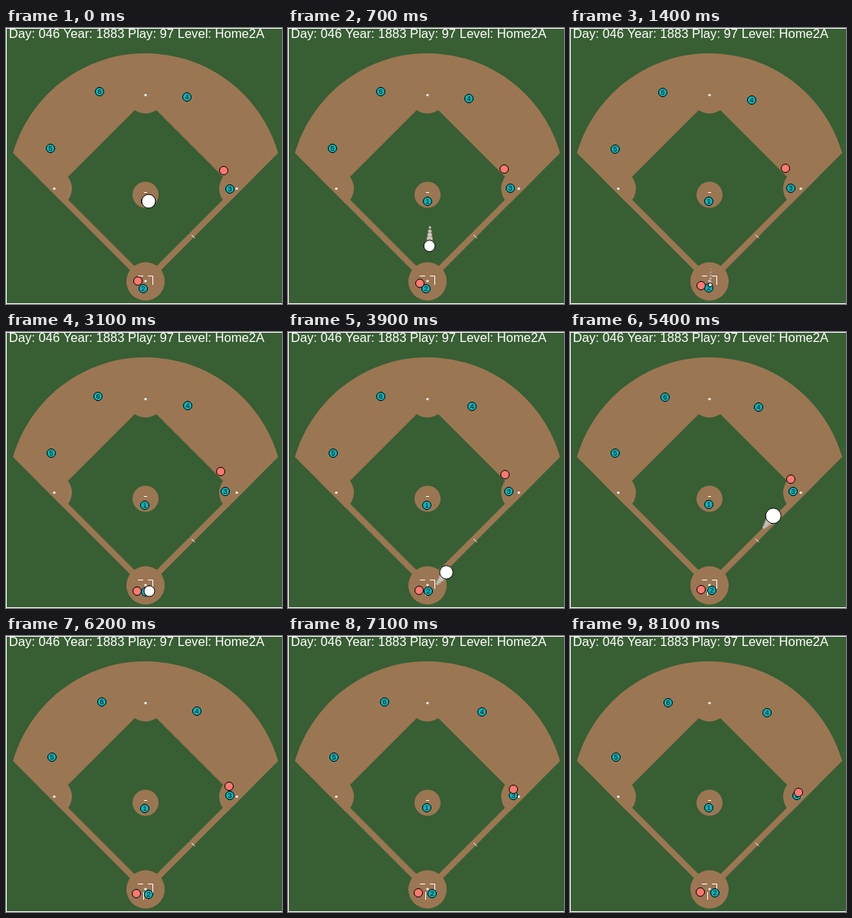
Animation of 360 by 360 pixels, one loop 8.2 s. Source, as an HTML page with a canvas:

```html
<!DOCTYPE html>
<html lang="en">
<head>
<meta charset="utf-8">
<title>Baseball play</title>
<style>
html, body { margin: 0; width: 100%; height: 100%; overflow: hidden; background: #385e33; }
canvas { display: block; font-kerning: none; }
</style>
</head>
<body>
<canvas id="stage" width="360" height="360"></canvas>
<script>
const ctx = document.getElementById('stage').getContext('2d');
const GRASS = '#385e33', DIRT = '#9b7653', TEAL = '#00b7be', SALMON = '#ff7870';
const LOOP = 8200, STEP = 100;
const CENTER = 182, BASE_Y = 209.5, BASE_GAP = 119, CUTOUT = 25;
const TURN = 3.1, THROW = 3.4, CATCH = 6.15, PITCH = 1.4, END = 8.1;

// Each player settles from start to ready, then drifts on to end
const players = [
  { label: '6', start: [122, 83], ready: [120, 84], end: [128, 87] },
  { label: '4', start: [236, 90], ready: [237, 96], end: [257, 100] },
  { label: '5', start: [58, 157], ready: [59, 158], end: [60, 158] },
  { label: '3', start: [292, 210], ready: [286, 208], end: [296, 208] },
  { label: '1', start: [182, 226], ready: [181, 226], end: [181, 224] },
  { label: '2', start: [179, 340], ready: [182, 339], end: [189, 335] },
  { start: [284, 186], ready: [280, 182], end: [298, 204] },
  { start: [172, 330], ready: [171, 338], end: [170, 334] }
];

const lerp = (a, b, k) => a + (b - a) * k;

function disc(x, y, r, fill, outline) {
  ctx.beginPath();
  ctx.arc(x, y, r, 0, Math.PI * 2);
  ctx.fillStyle = fill;
  ctx.fill();
  if (outline) {
    ctx.strokeStyle = outline;
    ctx.lineWidth = 1;
    ctx.stroke();
  }
}

function trace(...points) {
  ctx.beginPath();
  for (const [x, y] of points) ctx.lineTo(x, y);
}

function chalk(...points) {
  trace(...points);
  ctx.strokeStyle = '#fff';
  ctx.lineWidth = 1;
  ctx.stroke();
}

function traceDirt() {
  const edge = Math.atan2(-50, 173);
  ctx.beginPath();
  ctx.arc(CENTER, 213, 180, Math.PI - edge, edge);
  ctx.lineTo(CENTER, 336);
  ctx.closePath();
}

function drawField() {
  ctx.fillStyle = '#fff';
  ctx.fillRect(0, 0, 360, 360);
  ctx.fillStyle = GRASS;
  ctx.fillRect(1, 1, 359, 358);

  traceDirt();
  ctx.fillStyle = DIRT;
  ctx.fill();
  trace([CENTER, 93], [298, 209], [CENTER, 325], [66, 209]);
  ctx.fillStyle = GRASS;
  ctx.fill();

  // Base cutouts stay inside the foul lines
  ctx.save();
  traceDirt();
  ctx.clip();
  for (const side of [-1, 1]) disc(CENTER + side * (BASE_GAP + 2), BASE_Y, CUTOUT, DIRT);
  disc(CENTER, 86.5, CUTOUT, DIRT);
  ctx.restore();
  disc(CENTER, 217.5, 17, DIRT);
  disc(CENTER, 330.5, CUTOUT, DIRT);

  for (const side of [-1, 1]) disc(CENTER + side * BASE_GAP, BASE_Y, 1.6, '#fff');
  for (const y of [87.5, 330]) disc(CENTER, y, 1.6, '#fff');
  chalk([180, 214.5], [184, 214.5]);
  chalk([242, 270], [246.5, 274]);
  chalk([172, 323.5], [179, 323.5]);
  chalk([185, 323.5], [191.5, 323.5], [191.5, 335]);
  chalk([179.5, 334], [179.5, 344]);

  ctx.fillStyle = '#fff';
  ctx.font = '16.6px "Liberation Sans", Arial, sans-serif';
  ctx.textAlign = 'left';
  ctx.fillText('Day: 046 Year: 1883 Play: 97 Level: Home2A', 3.8, 13);
}

function drawPlayer({ label, start, ready, end }, t) {
  const settle = 1 - (1 - t / TURN) ** 2;
  const drift = (t - TURN) / (END - TURN);
  const [x, y] = [0, 1].map(i => Math.round(
    t < TURN ? lerp(start[i], ready[i], settle) : lerp(ready[i], end[i], drift)));
  disc(x, y, 5.5, label ? TEAL : SALMON, '#000');
  if (!label) return;
  ctx.fillStyle = '#000';
  ctx.font = '9px "Liberation Sans", Arial, sans-serif';
  ctx.textAlign = 'center';
  ctx.fillText(label, x, y + 3.2);
}

// Pitch, roll behind the plate, pick-up, then the throw to first
function ballAt(t) {
  if (t <= PITCH) {
    const u = t / PITCH;
    return [186 - 3 * u, 226 + 124 * u - 15 * u * u, 9 - 6.5 * u * u];
  }
  if (t < 2.25) {
    const u = Math.min(1, (t - PITCH) / 0.7);
    return [183 + 4 * u, 335 + 3 * u, 2.5];
  }
  const s = Math.max(0, t - THROW);
  return [187 + 39.1 * s, 338 - 49.1 * s, 7 + 4 * s - 1.25 * s * s];
}

function drawBall(t) {
  if (t > CATCH) return;
  const [x, y, r] = ballAt(t);
  const release = t <= PITCH ? 0 : THROW;
  for (let n = 5; n > 0; n--) {
    const past = t - n * 0.06;
    if (past < release) continue;
    const [px, py] = ballAt(past);
    disc(px, py, r * (0.7 - n * 0.1), '#d6cfc6', '#a39a8e');
  }
  disc(x, y, r, '#fff', '#000');
}

function render(now) {
  const t = Math.floor(now % LOOP / STEP) * STEP / 1000;
  drawField();
  players.forEach(p => drawPlayer(p, t));
  drawBall(t);
}

const origin = performance.now();
function tick() {
  render(performance.now() - origin);
  requestAnimationFrame(tick);
}
tick();
</script>
</body>
</html>
```
